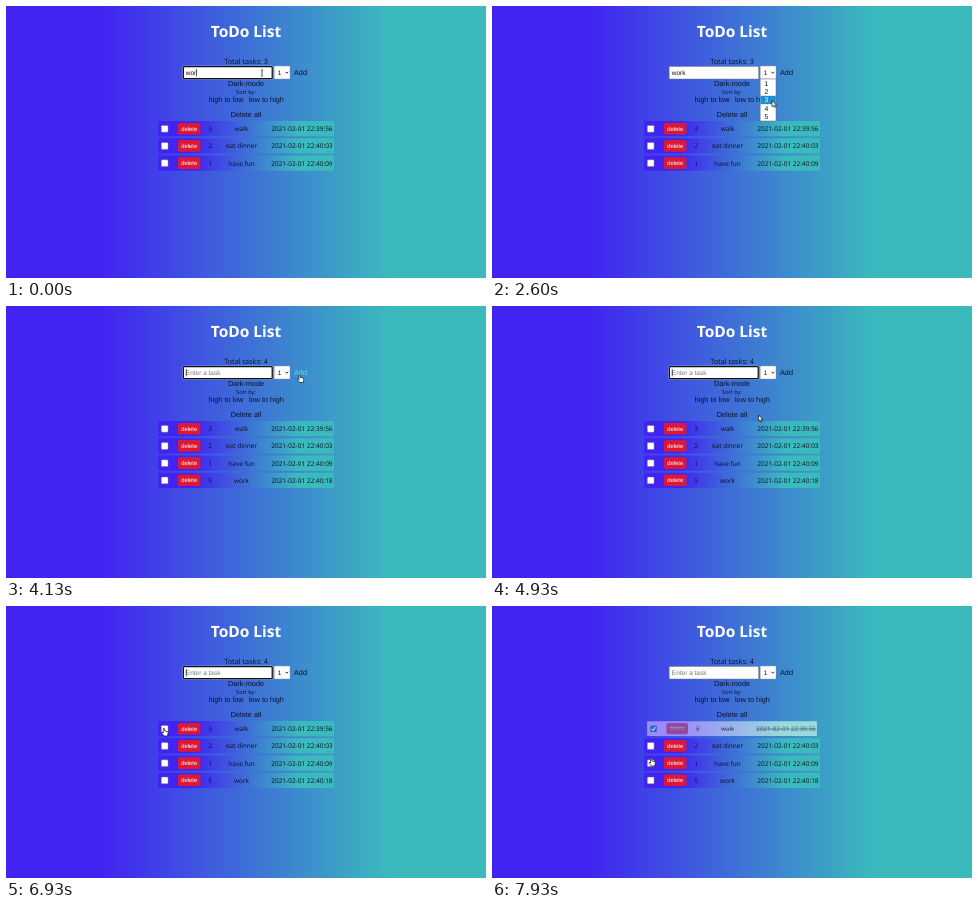
Write an HTML page with a canvas that moves like this. It is 480 px wide and 272 px high and loops after 8 s.

```html
<!DOCTYPE html>
<html lang="en">
<head>
<meta charset="utf-8">
<title>ToDo List</title>
<style>
html, body { margin: 0; width: 100%; height: 100%; overflow: hidden; background: #4123f2; }
canvas { display: block; width: 480px; height: 272px; }
</style>
</head>
<body>
<canvas id="stage" width="480" height="272"></canvas>
<script>
const ctx = document.getElementById('stage').getContext('2d');
const LOOP = 8000;
const BLUE = '#4123f2', TEAL = '#3bbabd', INK = '#0b1028';
const SANS = '"Open Sans", "Noto Sans", sans-serif';
const ARIAL = '"Liberation Sans", Arial, sans-serif';

// Moments at which the page state changes, in ms
const AT = { type: 400, blur: 2230, open: 2230, pick: 2930, add: 3600, check: 7200 };
const BLINK = 535;

const TASKS = [
  { rank: 3, name: 'walk', date: '2021-02-01 22:39:56' },
  { rank: 2, name: 'eat dinner', date: '2021-02-01 22:40:03' },
  { rank: 1, name: 'have fun', date: '2021-02-01 22:40:09' },
  { rank: 5, name: 'work', date: '2021-02-01 22:40:18' }
];

// Pointer path: time, x, y
const PATH = [
  [0, 256, 67], [1700, 256, 67], [1930, 346, 74], [2200, 279, 68], [2300, 279, 70],
  [2580, 280, 94.5], [2680, 280, 95], [2900, 279, 109], [3000, 279, 109],
  [3350, 293, 68.5], [4300, 293, 68.5], [5250, 257, 123.5], [6000, 257, 123.5],
  [6800, 157.3, 122], [7400, 157.3, 122], [7850, 158.5, 152], [8000, 158.5, 152]
];

const clamp = v => Math.max(0, Math.min(1, v));
const ease = v => v * v * (3 - 2 * v);

function pointerAt(t) {
  const i = Math.max(1, PATH.findIndex(p => p[0] > t));
  const [t0, x0, y0] = PATH[i - 1], [t1, x1, y1] = PATH[i];
  const k = ease(clamp((t - t0) / (t1 - t0)));
  return { x: x0 + (x1 - x0) * k, y: y0 + (y1 - y0) * k };
}

function sweep(x, w) {
  const g = ctx.createLinearGradient(x, 0, x + w, 0);
  g.addColorStop(0.2, BLUE);
  g.addColorStop(0.8, TEAL);
  return g;
}

function text(str, x, y, size, { font = ARIAL, color = INK, align = 'left', weight = 400 } = {}) {
  ctx.font = `${weight} ${size}px ${font}`;
  ctx.fillStyle = color;
  ctx.textAlign = align;
  ctx.fillText(str, x, y);
}

function box(x, y, w, h, r, fill, stroke, line = 1) {
  ctx.beginPath();
  ctx.roundRect(x, y, w, h, r);
  if (fill) { ctx.fillStyle = fill; ctx.fill(); }
  if (stroke) { ctx.strokeStyle = stroke; ctx.lineWidth = line; ctx.stroke(); }
}

function polyline(points, color, line) {
  ctx.beginPath();
  points.forEach(([x, y]) => ctx.lineTo(x, y));
  ctx.strokeStyle = color;
  ctx.lineWidth = line;
  ctx.stroke();
}

function drawHeader(count, hoverAdd) {
  text('ToDo List', 240, 31.3, 15.5, { font: SANS, color: '#fff', align: 'center', weight: 700 });
  text('Total tasks: ' + count, 240, 58, 7.3, { font: SANS, align: 'center' });
  text('Add', 288, 69, 7.3, { color: hoverAdd ? '#52e2dc' : INK });
  text('Dark-mode', 240, 80, 7.3, { align: 'center' });
  text('Sort by:', 240, 88, 5.6, { font: SANS, align: 'center' });
  text('high to low', 202.6, 96.4, 7.3);
  text('low to high', 243, 96.4, 7.3);
  text('Delete all', 240, 111, 7.3, { align: 'center' });
}

function drawInput(t) {
  const focused = t < AT.blur || (t >= AT.add && t < AT.check);
  const value = t < AT.type ? 'wor' : t < AT.add ? 'work' : '';
  if (focused) {
    box(176.6, 60, 90.4, 13.4, 1.5, null, 'rgba(255,255,255,.6)', 0.6);
    box(177.4, 60.7, 88.8, 12, 1, '#fff', '#111', 1.2);
  } else {
    box(177.2, 60.4, 89.4, 12.6, 0.5, '#fff', '#777', 0.5);
  }
  text(value || 'Enter a task', 179.8, 69, 6.5, { color: value ? '#111' : '#777' });
  const since = t < AT.type ? 0 : t - (t < AT.add ? AT.type : AT.add);
  if (focused && Math.floor(since / BLINK) % 2 === 0) {
    ctx.font = `6.5px ${ARIAL}`;
    ctx.fillStyle = '#111';
    ctx.fillRect(179.8 + ctx.measureText(value).width, 63, 0.7, 7.4);
  }
}

function drawSelect(t) {
  box(268.2, 60, 15.8, 13, 0.5, '#fff', '#888', 0.4);
  text(t >= AT.pick && t < AT.add ? '5' : '1', 271.8, 69, 6.5, { color: '#111' });
  polyline([[279.4, 65.8], [280.8, 67.3], [282.2, 65.8]], '#222', 0.9);
}

function drawMenu(t, pointer) {
  if (t < AT.open || t >= AT.pick) return;
  box(268.2, 73, 15.8, 42, 0, '#fff', '#666', 0.5);
  const hovered = Math.max(0, Math.min(4, Math.floor((pointer.y - 73) / 8.4)));
  for (let i = 0; i < 5; i++) {
    const y = 73 + i * 8.4;
    if (i === hovered) box(268.4, y, 15.4, 8.4, 0, '#1e90d2');
    text(i + 1, 272.4, y + 6.5, 6.8, { color: i === hovered ? '#fff' : '#111' });
  }
}

function drawRow(task, index, done) {
  const mid = 122.7 + index * 17.2;
  const scale = 1 - 0.035 * done;
  const fade = 1 - 0.4 * done;
  ctx.save();
  ctx.translate(240, mid);
  ctx.scale(scale, scale);
  ctx.translate(-240, 0);
  box(152, -7.6, 176, 15.2, 1, sweep(152, 176));
  if (done) box(152, -7.6, 176, 15.2, 1, `rgba(255,255,255,${0.48 * done})`);
  ctx.globalAlpha = fade;
  box(172, -5.8, 22.4, 11.6, 1.8, done > 0.5 ? '#8c1a6a' : '#dc1836');
  text('delete', 183.2, 1.8, 5.9, { color: '#fff', align: 'center' });
  const cell = { font: SANS, align: 'center' };
  text(task.rank, 204.2, 2.5, 6.5, cell);
  text(task.name, 235.5, 2.5, 6.5, cell);
  text(task.date, 295.9, 2.5, 6.5, cell);
  if (done > 0.5) {
    ctx.fillStyle = INK;
    for (const [x, w] of [[175, 16.4], [202.3, 3.8], [229, 13], [265, 62]]) ctx.fillRect(x, 0, w, 0.6);
  }
  ctx.globalAlpha = 1;
  if (done) {
    box(155.3, -3.3, 6.8, 6.8, 0.9, '#2d68d8');
    polyline([[156.7, 0.2], [158.1, 1.7], [160.9, -1.6]], '#fff', 1);
  } else {
    box(155.3, -3.3, 6.8, 6.8, 0.9, '#fff', '#667', 0.4);
  }
  ctx.restore();
}

const SHAPES = {
  arrow: 'M0 0V6.2L1.5 4.9L2.5 7L3.5 6.5L2.6 4.5H4.5Z',
  hand: 'M0 .5Q.8-.4 1.4.5V3L4.1 3.6Q5 4 4.8 5L4.2 8H.9L-1.5 5.2Q-1.5 4.1-.5 4.5L0 5Z'
};

function drawPointer({ x, y }, kind) {
  ctx.save();
  ctx.translate(x, y);
  if (kind === 'beam') {
    polyline([[0, -3], [0, 3]], '#222', 0.8);
    polyline([[-1.1, -3.1], [1.1, -3.1]], '#222', 0.6);
    polyline([[-1.1, 3.1], [1.1, 3.1]], '#222', 0.6);
  } else {
    const shape = new Path2D(SHAPES[kind]);
    ctx.lineJoin = 'round';
    ctx.fillStyle = '#fff';
    ctx.strokeStyle = '#111';
    ctx.lineWidth = 0.7;
    ctx.fill(shape);
    ctx.stroke(shape);
  }
  ctx.restore();
}

function draw(t) {
  const p = pointerAt(t);
  const inside = (x0, y0, x1, y1) => p.x >= x0 && p.x <= x1 && p.y >= y0 && p.y <= y1;
  const overAdd = inside(287, 62, 302, 73);
  const overInput = inside(177, 60, 267, 73);
  const overCheck = inside(154, 117, 164, 182);
  const count = t < AT.add ? 3 : 4;

  ctx.fillStyle = sweep(0, 480);
  ctx.fillRect(0, 0, 480, 272);
  drawHeader(count, overAdd);
  drawInput(t);
  drawSelect(t);
  TASKS.slice(0, count).forEach((task, i) =>
    drawRow(task, i, i === 0 ? ease(clamp((t - AT.check) / 250)) : 0));
  drawMenu(t, p);
  drawPointer(p, overInput ? 'beam' : overAdd || overCheck ? 'hand' : 'arrow');
}

ctx.textRendering = 'geometricPrecision';
const start = performance.now();
function tick() {
  draw((performance.now() - start) % LOOP);
  requestAnimationFrame(tick);
}
tick();
</script>
</body>
</html>
```
